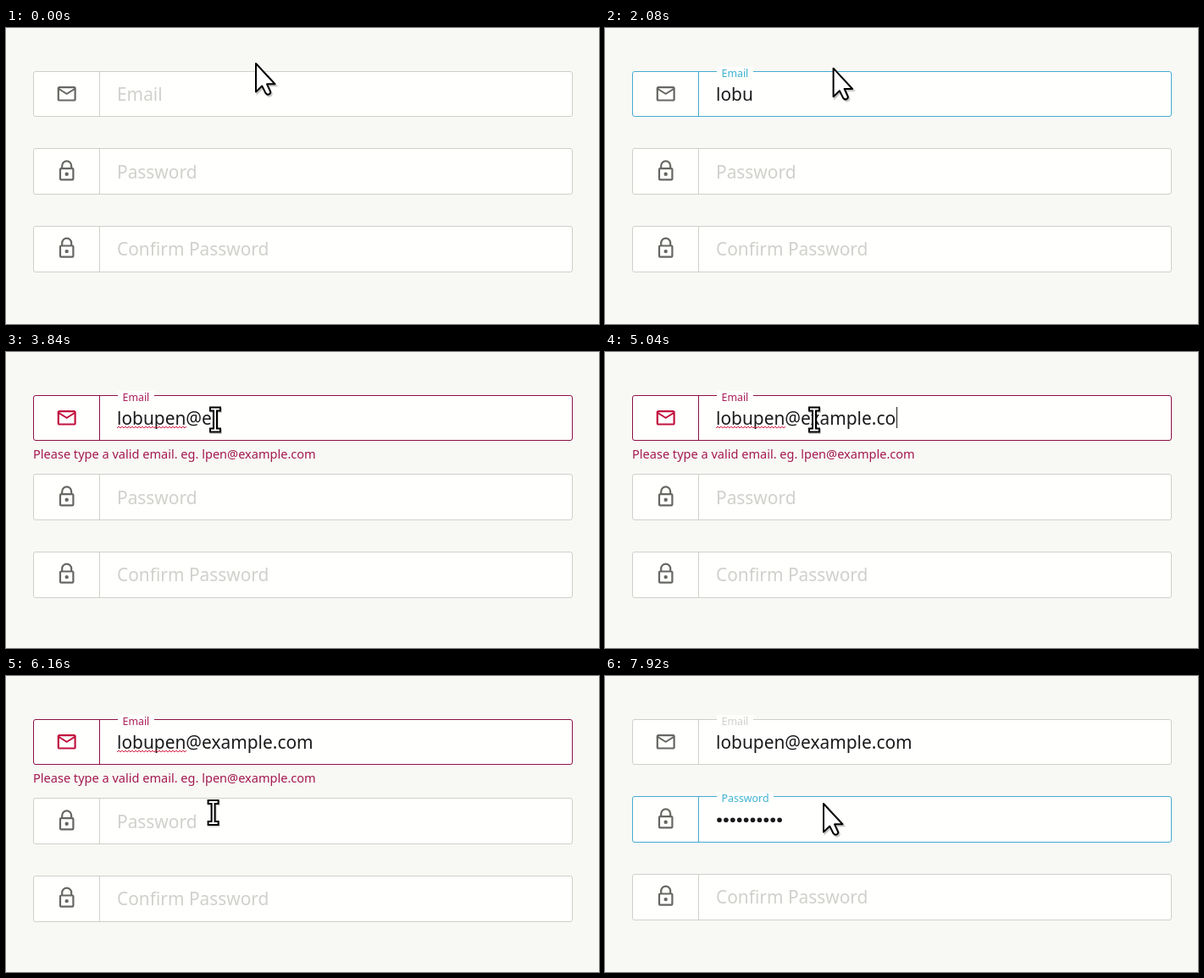
An HTML page for the animation above (8 s loop, 700 by 350 pixels).

```html
<!DOCTYPE html>
<html lang="en">
<head>
<meta charset="utf-8">
<title>Form validation</title>
<style>
  html, body { margin: 0; width: 100%; height: 100%; overflow: hidden; background: #f8f8f5; }
  svg { display: block; width: 100%; height: 100%; }
  text { font-family: "Noto Sans", "Open Sans", sans-serif; white-space: pre; }
</style>
</head>
<body>
<svg id="stage" viewBox="0 0 700 350"></svg>
<script>
const LOOP = 8000, STEP = 80, SIZE = 20.9, FADE = 160;
const stage = document.getElementById('stage');

const TONES = {
  idle:  { border: [207, 207, 202], label: [208, 208, 204], icon: [102, 102, 98] },
  focus: { border: [68, 170, 207],  label: [62, 178, 210],  icon: [102, 102, 98] },
  error: { border: [140, 16, 66],   label: [172, 32, 90],   icon: [194, 17, 63] }
};
const MAIL = 'M22 6c0-1.1-.9-2-2-2H4c-1.1 0-2 .9-2 2v12c0 1.1.9 2 2 2h16c1.1 0 2-.9 2-2V6z' +
  'm-2 0l-8 5-8-5h16zm0 12H4V8l8 5 8-5v10z';
const LOCK = 'M6 8V6a6 6 0 0 1 12 0v2a2 2 0 0 1 2 2v10a2 2 0 0 1-2 2H6a2 2 0 0 1-2-2V10a2 2 0 0 1 2-2z' +
  'M8 8h8V6a4 4 0 0 0-8 0zM6 10v10h12V10zM12 13a2 2 0 1 1 0 4a2 2 0 1 1 0-4z';

const ADDRESS = 'lobupen@example.com';
// When each character of the address is typed
const KEYS = [1280, 1440, 1600, 1760, 3120, 3280, 3440, 3600, 3840, 4000,
  4080, 4240, 4320, 4400, 4560, 4800, 4960, 5040, 5200];
// When each password dot is typed
const DOTS = Array.from({ length: 10 }, (_, i) => i ? 7040 + (i - 1) * 70 : 6800);
const ERROR_AT = 2240, VALID_AT = 6320, SPELL_AT = 3680;

// Pointer: time, x, y
const PATH = [
  [320, 294, 41], [640, 261, 72], [1840, 261, 72], [2160, 270, 42], [2320, 270, 42],
  [2400, 265, 43], [2480, 253, 34], [2880, 247, 80], [5280, 247, 80], [5840, 224, 132],
  [6240, 247, 165], [7600, 247, 165], [7760, 274, 140], [7920, 257, 150]
];
const BEAM = [[480, 1920], [2640, 5440], [6000, 7680]];

function add(parent, tag, attrs = {}, text) {
  const el = document.createElementNS('http://www.w3.org/2000/svg', tag);
  set(el, attrs);
  if (text) el.textContent = text;
  return parent.appendChild(el);
}
function set(el, attrs) {
  for (const k in attrs) el.setAttribute(k, attrs[k]);
}
const show = (el, on) => el.setAttribute('visibility', on ? 'visible' : 'hidden');
const clamp = v => Math.min(1, Math.max(0, v));
const ease = v => v * v * (3 - 2 * v);
const lerp = (a, b, p) => a + (b - a) * p;
const ramp = (t, start, length) => ease(clamp((t - start) / length));
const mix = (a, b, p) => a.map((v, i) => Math.round(lerp(v, b[i], p)));
const rgb = c => `rgb(${c})`;

function makeField({ y, h, base, name, icon, iconY, chip, tones, float }) {
  const g = add(stage, 'g');
  const box = add(g, 'rect', { x: 32.5, y, width: 636, height: h, rx: 2.5, fill: '#fffffd' });
  const line = add(g, 'path', { d: `M110.5 ${y}v${h}` });
  const mark = add(g, 'path', { d: icon, 'fill-rule': 'evenodd', transform: `translate(58.5 ${iconY}) scale(1.1)` });
  const patch = add(g, 'rect', { x: 132, y: y - 5.5, width: chip, height: 14, fill: '#fefefc' });
  const label = add(g, 'text', {}, name);

  return t => {
    let tone = TONES.idle;
    for (const [at, key] of tones) {
      const next = TONES[key], p = ramp(t, at, FADE);
      tone = {
        border: mix(tone.border, next.border, p),
        label: mix(tone.label, next.label, p),
        icon: mix(tone.icon, next.icon, p)
      };
    }
    const p = ramp(t, float, 200);
    set(box, { stroke: rgb(tone.border) });
    set(line, { stroke: rgb(tone.border) });
    set(mark, { fill: rgb(tone.icon) });
    set(patch, { opacity: p });
    set(label, {
      x: lerp(131, 137.5, p), y: lerp(base, y + 6.5, p),
      'font-size': lerp(SIZE, 12.4, p), fill: rgb(tone.label)
    });
    const drop = name !== 'Email' && t >= ERROR_AT && t < VALID_AT;
    set(g, { transform: `translate(0 ${drop ? 2 : 0})` });
  };
}

const fields = [
  { y: 51.5, h: 53, base: 86, name: 'Email', icon: MAIL, iconY: 64.6, chip: 43, float: 720,
    tones: [[720, 'focus'], [ERROR_AT, 'error'], [VALID_AT, 'idle']] },
  { y: 142.5, h: 54, base: 178, name: 'Password', icon: LOCK, iconY: 156.3, chip: 67, float: VALID_AT,
    tones: [[VALID_AT, 'focus']] },
  { y: 234.5, h: 54, base: 269, name: 'Confirm Password', icon: LOCK, iconY: 247.6, chip: 0, float: LOOP * 2,
    tones: [] }
].map(makeField);

const value = add(stage, 'text', { x: 131, y: 86, 'font-size': SIZE, fill: '#1b1b1d' });
const hint = add(stage, 'text', { x: 32, y: 126, 'font-size': 14.55, fill: '#a3194f' },
  'Please type a valid email. eg. lpen@example.com');
const wave = add(stage, 'path', {
  d: 'M131 90' + Array.from({ length: 41 }, (_, i) => `l2 ${i % 2 ? 2 : -2}`).join(''),
  fill: 'none', stroke: '#d8284c', 'stroke-width': 1
});
const dots = DOTS.map((_, i) => add(stage, 'circle', { cx: 135 + i * 7.9, cy: 170.3, r: 2.8, fill: '#1b1b1d' }));
const caret = add(stage, 'rect', { width: 1, height: 25, fill: '#1b1b1d' });

const arrow = add(stage, 'g');
const ARROW = 'M1 1V34.5L8.3 27.6L12.6 36.2Q14.5 38.6 17 37.2Q19 35.8 17.8 33.6L14 25.3H23.5Z';
add(arrow, 'path', { d: ARROW, transform: 'translate(1.5 2)', fill: '#000', stroke: '#000', 'stroke-width': 2, opacity: .22 });
add(arrow, 'path', { d: ARROW, fill: '#fff', stroke: '#000', 'stroke-width': 2, 'stroke-linejoin': 'round' });

const beam = add(stage, 'g', { fill: 'none', 'stroke-linecap': 'square' });
const IBEAM = 'M-4 -12.5H4M0 -12.5V12.5M-4 12.5H4';
add(beam, 'path', { d: IBEAM, transform: 'translate(1 1.5)', stroke: '#000', 'stroke-width': 6, opacity: .18 });
add(beam, 'path', { d: IBEAM, stroke: '#000', 'stroke-width': 6 });
add(beam, 'path', { d: IBEAM, stroke: '#fff', 'stroke-width': 2 });

function pointerAt(t) {
  let [, x, y] = PATH[0];
  for (let i = 1; i < PATH.length; i++) {
    const p = ramp(t, PATH[i - 1][0], PATH[i][0] - PATH[i - 1][0]);
    x = lerp(x, PATH[i][1], p);
    y = lerp(y, PATH[i][2], p);
  }
  return [x, y];
}

function drawCaret(t, typed, count) {
  const keys = count ? DOTS : KEYS;
  const last = count ? keys[count - 1] : keys[typed - 1];
  const focused = count || t < 1840 || t >= 2880;
  show(caret, last !== undefined && focused && t - last < 300);
  if (count) set(caret, { x: 131 + count * 7.9, y: 157 });
  else if (typed) set(caret, { x: 132 + value.getComputedTextLength(), y: 65 });
}

function render(t) {
  fields.forEach(draw => draw(t));

  const typed = KEYS.filter(k => k <= t).length;
  const count = DOTS.filter(k => k <= t).length;
  value.textContent = ADDRESS.slice(0, typed);
  dots.forEach((dot, i) => show(dot, i < count));
  drawCaret(t, typed, count);

  show(hint, t >= ERROR_AT && t < VALID_AT);
  set(hint, { opacity: ramp(t, ERROR_AT, FADE) });
  show(wave, t >= SPELL_AT && t < VALID_AT);

  const move = `translate(${pointerAt(t)})`;
  const inText = BEAM.some(([a, b]) => t >= a && t < b);
  set(arrow, { transform: move });
  set(beam, { transform: move });
  show(arrow, !inText);
  show(beam, inText);
}

function tick() {
  const t = performance.now() % LOOP;
  render(Math.floor(t / STEP) * STEP);
  requestAnimationFrame(tick);
}
tick();
</script>
</body>
</html>
```
